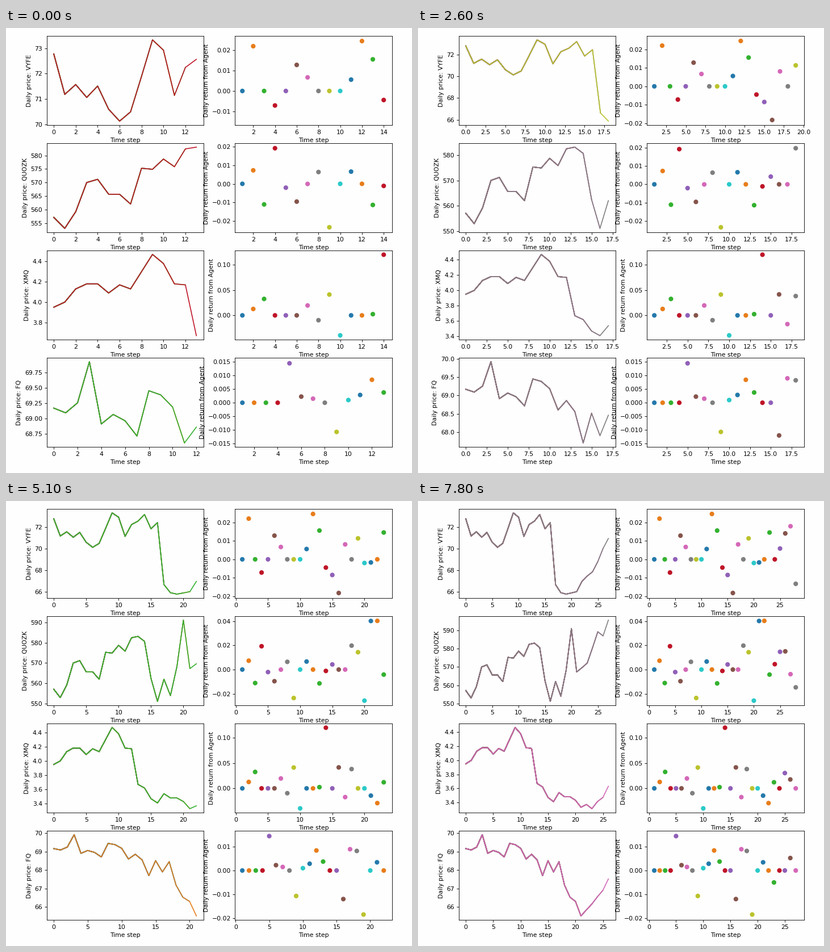
A matplotlib script that plays this animation: 715 by 784 pixels, repeating every 8 s.

```python
import numpy as np
import matplotlib.pyplot as plt
from matplotlib.animation import FuncAnimation

WIDTH, HEIGHT, DPI = 715, 784, 78.4
PAPER = "#fefefe"
PALETTE = ["#2479ab", "#e87d1a", "#33b12f", "#bf1528", "#9060b8",
           "#85544b", "#d468b8", "#7f7f7f", "#bbc32c", "#2bc9c9"]

# Axes geometry in pixels from the top left corner
LEFT_X, RIGHT_X, TOP_Y = 71.6, 403.4, 13.7
AX_W, AX_H, ROW_STEP = 276.2, 157.5, 189.0

# Per stock: daily prices and the agent's position each day (long +, short -, out 0)
STOCKS = {
    "VYFE": ([72.78, 71.18, 71.57, 71.06, 71.51, 70.595, 70.124, 70.49, 71.894,
              73.337, 72.928, 71.141, 72.246, 72.567, 73.18, 71.85, 72.43, 66.645,
              65.89, 65.76, 65.87, 65.99, 66.946, 67.446, 67.84, 68.79, 70.02, 70.945],
             "0-0+0--000--+--++0-+-0+0+++-"),
    "QUOZK": ([557.12, 553.05, 559.22, 570.0, 571.19, 565.69, 565.66, 562.05, 575.28,
               574.89, 578.69, 575.84, 582.43, 583.09, 580.63, 562.48, 551.17, 562.07,
               554.01, 568.26, 591.08, 567.28, 569.64, 572.17, 580.56, 589.3, 587.05,
               595.69],
              "0--+-++--0+0---00+--+--++++-"),
    "XMQ": ([3.95, 4.0, 4.13, 4.18, 4.18, 4.09, 4.17, 4.13, 4.3, 4.47, 4.38, 4.18,
             4.17, 3.67, 3.62, 3.47, 3.41, 3.54, 3.48, 3.48, 3.43, 3.33, 3.37, 3.31,
             3.41, 3.47, 3.63],
            "0++000+++-00--0-++00+++0++0"),
    "FQ": ([69.17, 69.093, 69.256, 69.926, 68.912, 69.067, 68.964, 68.715, 69.453,
            69.385, 69.187, 68.603, 68.861, 68.56, 67.7, 68.515, 67.9, 68.46, 67.19,
            66.53, 66.3, 65.51, 65.84, 66.16, 66.55, 66.9, 67.52],
           "0000-+-0----+00--++0-0-00+0"),
}

# Stocks gain a point in turn; each entry is the tick at which the next one does
START = 55
UPDATES = np.array([2, 3, 4, 6, 7, 9, 10, 12, 13, 16, 16, 17, 19, 20, 22, 24, 25, 26,
                    28, 29, 31, 33, 34, 35, 37, 38, 39, 41, 42, 45, 45, 46, 47, 49,
                    50, 51, 53, 54, 56, 57, 58, 60, 61, 62, 64, 65, 67, 68, 69, 71,
                    72, 74, 75, 77, 78])


def with_margin(low, high):
    margin = 0.05 * (high - low)
    return low - margin, high + margin


class StockRow:
    def __init__(self, fig, row, name, prices, positions):
        self.prices = np.array(prices)
        change = np.diff(self.prices, prepend=self.prices[0])
        previous = np.r_[self.prices[0], self.prices[:-1]]
        sides = np.array(["-0+".index(p) - 1 for p in positions])
        self.returns = sides * change / previous
        self.colors = [PALETTE[i % 10] for i in range(len(prices))]

        self.price_ax = self.add_axes(fig, LEFT_X, row, f"Daily price: {name}")
        self.return_ax = self.add_axes(fig, RIGHT_X, row, "Daily return from Agent")
        # Every day redraws the whole history on top of the earlier lines
        self.lines = [self.price_ax.plot(self.prices[:i + 1], color=c, lw=1.5)[0]
                      for i, c in enumerate(self.colors)]
        self.dots = self.return_ax.scatter([], [], s=36, lw=1.5)

    @staticmethod
    def add_axes(fig, x, row, label):
        bottom = HEIGHT - TOP_Y - row * ROW_STEP - AX_H
        ax = fig.add_axes([x / WIDTH, bottom / HEIGHT, AX_W / WIDTH, AX_H / HEIGHT],
                          facecolor=PAPER)
        ax.set_xlabel("Time step")
        ax.set_ylabel(label)
        return ax

    def show(self, n):
        for i, line in enumerate(self.lines):
            line.set_visible(i < n)
        prices, returns = self.prices[:n], self.returns[:n]
        self.price_ax.set_xlim(with_margin(0, n - 1))
        self.price_ax.set_ylim(with_margin(prices.min(), prices.max()))

        self.dots.set_offsets(np.c_[np.arange(1, n + 1), returns])
        self.dots.set_facecolor(self.colors[:n])
        self.dots.set_edgecolor(self.colors[:n])
        # Limits leave a little room for the marker size
        self.return_ax.set_xlim(with_margin(0.985, 1.007 * n))
        self.return_ax.set_ylim(with_margin(min(returns.min() - 0.0006, -0.0148),
                                            max(returns.max() + 0.0006, 0.0148)))


plt.rcParams.update({"font.family": "DejaVu Sans", "font.size": 10})
fig = plt.figure(figsize=((WIDTH + 1e-6) / DPI, (HEIGHT + 1e-6) / DPI),
                 dpi=DPI, facecolor=PAPER)
rows = [StockRow(fig, r, name, *data) for r, (name, data) in enumerate(STOCKS.items())]


def update(tick):
    total = START + np.count_nonzero(UPDATES <= tick)
    for r, stock in enumerate(rows):
        stock.show((total - r + 3) // 4)


anim = FuncAnimation(fig, update, frames=80, interval=100, repeat=True, repeat_delay=0)
plt.show()
```
